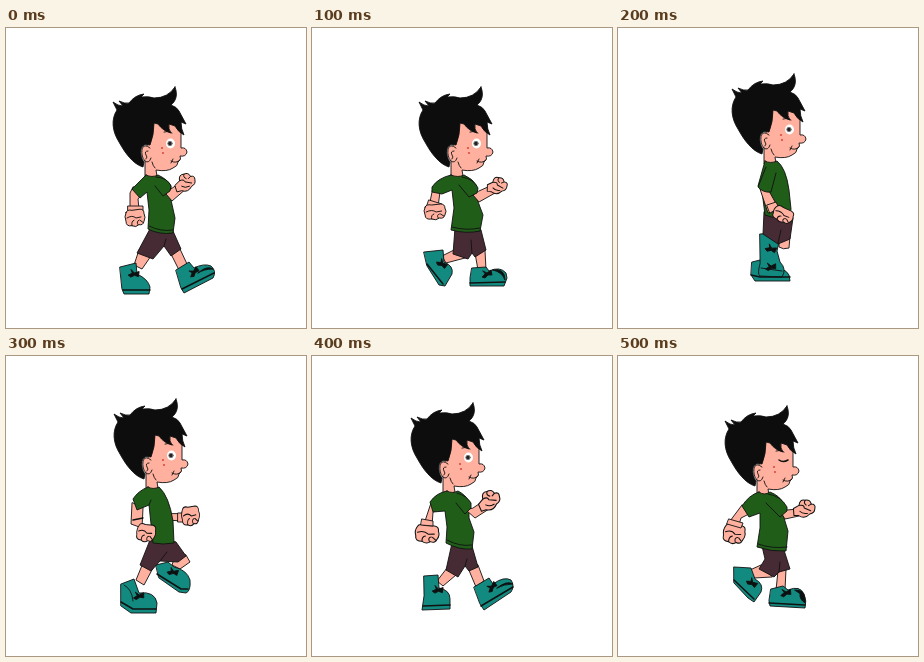
Write an HTML page that moves like this. It is 300x300 px and loops after 600 ms.

```html
<!DOCTYPE html>
<html lang="en">
<head>
<meta charset="utf-8">
<title>Walking boy</title>
<style>
html, body { margin: 0; width: 100%; height: 100%; overflow: hidden; background: #fff; }
svg { display: block; width: 100vw; height: 100vh; }
path, circle { stroke: #111; stroke-width: .9; stroke-linejoin: round; stroke-linecap: round; }
.skin { fill: #ffb09e; }
.hair { fill: #0d0d0d; }
.shirt { fill: #205d19; }
.shorts { fill: #472b34; }
.shoe { fill: #128a80; }
.dark { fill: #0b1010; }
.line, .sole { fill: none; }
.sole { stroke-width: 1.5; }
.plain { stroke: none; }
.pose { visibility: hidden; animation: show .6s step-end infinite; animation-delay: calc(var(--i) * .1s - .6s); }
@keyframes show {
  0% { visibility: visible; }
  16.6667%, 100% { visibility: hidden; }
}
</style>
</head>
<body>
<svg viewBox="0 0 300 300">
<defs>
  <g id="head">
    <path class="skin" d="M139 132V149Q146 152 151 148L150 142Q161 144 167 140Q172 138 172 134Q176 131 174 128Q180 129 181 124Q180 119 175 120L175 100L158 88L145 92Z"/>
    <path class="hair" d="M169 59C172 67 170 73 165 77Q171 79 173 83L180 96L175 94Q175 101 178 107Q172 104 169 98L163 96Q162 101 165 105Q157 103 152 96L148 95Q148 107 144 117Q137 115 135 121Q134 129 138 134L137 139C127 136 119 125 113 114C106 103 105 91 111 82L107 74Q112 78 117 78L113 73Q119 76 123 75Q129 67 138 66L135 69Q143 68 148 70Q162 70 169 59Z"/>
    <path class="skin" d="M144 120Q138 115 136 121Q135 129 139 133Q143 136 145 130"/>
    <path class="line" d="M142 123Q138 123 140 127Q142 129 140 131M165 133Q170 136 174 132M167 131L165 135M146 134Q147 138 149 140M158 104Q162 102 166 105"/>
    <g fill="#d5362e"><circle class="plain" cx="156" cy="120" r=".9"/><circle class="plain" cx="157" cy="125" r=".9"/></g>
  </g>
  <g id="eye">
    <ellipse class="plain" cx="164.500" cy="115.500" rx="4.500" ry="5" fill="#fff"/>
    <circle cx="164" cy="115.500" r="2.200" fill="#222" style="stroke:#777"/>
  </g>
  <!-- fists are centred on the origin -->
  <g id="fist">
    <path class="skin" d="M-9-5Q-8-8-3-7L5-8Q9-8 9-4Q11-1 9 3Q8 7 4 6Q1 9-3 7Q-9 8-9 3Q-11-1-9-5Z"/>
    <path class="line" d="M-8 0Q-3-3 1 0L6-1M-3 7Q-4 3-1 2M3 6Q1 3 4 2M8 4L5 2"/>
  </g>
  <g id="punch">
    <path class="skin" d="M-9 2L-5-2Q-6-8-1-8Q3-10 5-6Q9-7 9-3Q10 1 6 3Q3 9-3 7L-7 8Z"/>
    <path class="line" d="M-5-2Q-1-4 0-1L6 0M-1-8Q-2-5 1-4M5-6L3-4M-3 3Q0 5 4 3"/>
  </g>
  <path id="lace" class="dark" d="M-4-3L0-1L4-4L5 1L1 1L-2 4L-5 3L-2 0Z"/>
</defs>

<g class="pose" style="--i:0">
  <path class="skin" d="M133 222L128 237L136 241L145 228ZM165 226L173 242L181 236L174 221Z"/>
  <path class="shoe" d="M114 239L130 235L131 246Q142 251 144 259L143 266H118L116 261Z"/>
  <path class="sole" d="M117 262H144"/>
  <use href="#lace" transform="translate(128 246) rotate(20)"/>
  <path class="shoe" d="M170 242L183 234L188 240Q198 235 205 238Q211 243 207 250L178 265L175 260Z"/>
  <path class="sole" d="M176 261L208 245"/>
  <path class="dark" d="M192 245Q201 237 207 241Q198 241 192 245Z"/>
  <use href="#lace" transform="translate(188 244) rotate(-25)"/>
  <path class="shorts" d="M145 199L131 225L147 231L158 218L165 228L175 221L167 203Z"/>
  <path class="line" d="M158 218L160 211"/>
  <use href="#head"/><use href="#eye"/>
  <path class="skin" d="M127 159L124 165V181H133L132 171L136 166Z"/>
  <path class="shirt" d="M140 147L126 161L134 170L141 164L143 182L142 201Q154 207 167 205L169 190L165 172L165 158Q161 151 152 147Q146 150 140 147Z"/>
  <path class="line" d="M143 198Q155 204 167 202"/>
  <path class="skin" d="M160 166L166 173L181 160L175 154L165 161Z"/>
  <path class="shirt" d="M150 149Q162 150 165 158L164 163L157 168L149 158"/>
  <path class="skin" d="M122 178H137V184H122Z"/>
  <use href="#fist" transform="translate(129 190) scale(1 1.100)"/>
  <use href="#punch" transform="translate(179 155) scale(1.100)"/>
</g>

<g class="pose" style="--i:1">
  <path class="skin" d="M142 222L130 228L134 235L153 230ZM163 225L166 242H174L173 222Z"/>
  <path class="shoe" d="M112 224L131 222L132 234Q142 238 140 246L133 258L127 257L115 238Z"/>
  <path class="sole" d="M115 236L131 256"/>
  <use href="#lace" transform="translate(130 236) rotate(50)"/>
  <path class="shoe" d="M160 240L174 239L177 243Q188 238 194 245L195 250L192 258H158V250Z"/>
  <path class="sole" d="M158 255L193 254"/>
  <path class="dark" d="M181 242Q193 240 193 252Q190 244 181 242Z"/>
  <use href="#lace" transform="translate(175 246)"/>
  <path class="shorts" d="M143 200L141 226L156 231L160 225L163 229L174 222L169 202Z"/>
  <path class="line" d="M160 225L159 212"/>
  <use href="#head"/><use href="#eye"/>
  <path class="skin" d="M121 159L117 179H126L128 164Z"/>
  <path class="shirt" d="M139 147Q126 150 120 159L120 164L130 166L140 162L142 180L139 202Q154 206 168 203L171 187L165 171L164 157Q161 151 152 147Q146 150 139 147Z"/>
  <path class="line" d="M140 199Q154 203 168 200"/>
  <path class="skin" d="M161 167L167 174L183 165L178 158L167 163Z"/>
  <path class="shirt" d="M150 149Q162 151 166 160L165 165L157 169L147 157"/>
  <path class="skin" d="M117 172L130 176L129 181L115 178Z"/>
  <use href="#fist" transform="translate(123 184) scale(1.100 1)"/>
  <use href="#punch" transform="translate(185 158) rotate(20) scale(1.050)"/>
</g>

<g class="pose" style="--i:2">
  <path class="skin" d="M161 209V219Q165 222 171 220L172 208Z"/>
  <path class="shoe" d="M134 234L146 231L149 238Q167 239 171 247L172 253H137L133 247Z"/>
  <path class="shoe" d="M142 206L158 205L161 214L159 223L162 234Q169 241 164 249L142 248Q139 246 142 236Z"/>
  <path class="sole" d="M133 247L142 249H172"/>
  <path class="line" d="M143 240L164 243"/>
  <use href="#lace" transform="translate(153 221) rotate(35)"/>
  <use href="#lace" transform="translate(153 239) rotate(10)"/>
  <path class="shorts" d="M146 184L145 206L160 216L172 211L175 190Z"/>
  <path class="line" d="M160 215L163 202"/>
  <use href="#head" transform="translate(7 -13)"/><use href="#eye" transform="translate(7 -14)"/>
  <path class="shirt" d="M147 133L140 158L144 163L147 187Q160 192 172 189L173 181L171 162Q168 140 159 133Q152 136 147 133Z"/>
  <path class="skin" d="M142 161L150 185L161 181L151 163Z"/>
  <path class="shirt" d="M148 139L140 159Q145 165 153 164L158 145"/>
  <path class="skin" d="M149 177L158 174L161 180L152 185Z"/>
  <use href="#fist" transform="translate(165 187) rotate(30) scale(1.050 .95)"/>
</g>

<g class="pose" style="--i:3">
  <path class="skin" d="M137 207L130 224L138 229L147 212ZM169 200L166 209L174 213L184 206L180 199Z"/>
  <path class="shoe" d="M115 228L128 223L133 237Q149 235 151 247L150 257H125L115 250Z"/>
  <path class="sole" d="M115 246L127 253H150"/>
  <path class="line" d="M118 229Q126 233 127 245"/>
  <use href="#lace" transform="translate(133 240) rotate(10)"/>
  <path class="shoe" d="M150 209L162 206L168 211Q181 214 184 224Q185 235 180 237L173 236L153 222Z"/>
  <path class="sole" d="M151 218L175 233L182 233"/>
  <use href="#lace" transform="translate(167 216) rotate(30)"/>
  <path class="shorts" d="M144 184L134 209L145 215L154 205L172 206L180 200L170 186Z"/>
  <path class="line" d="M154 205L161 196"/>
  <use href="#head" transform="translate(1 -16)"/><use href="#eye" transform="translate(1 -16)"/>
  <path class="skin" d="M126 147L125 168L136 172L137 152Z"/>
  <path class="skin" d="M160 158V164L177 165V158Z"/>
  <path class="shirt" d="M142 131Q132 135 127 143L131 154L143 149L147 187Q157 189 168 187L167 165Q163 140 153 131Q147 134 142 131Z"/>
  <path class="line" d="M143 149L145 144"/>
  <path class="sole" d="M127 164L137 162"/>
  <use href="#fist" transform="translate(140 177) rotate(15) scale(.95 1.150)"/>
  <path class="skin" d="M172 157H177V166H172Z"/>
  <use href="#fist" transform="translate(184.500 160) scale(.9 1.250)"/>
</g>

<g class="pose" style="--i:4">
  <path class="skin" d="M135 212L125 225L131 230L144 219ZM156 212L164 231L172 225L166 209Z"/>
  <path class="shoe" d="M112 220L126 219L127 232Q138 234 138 243V253L110 254L112 240Z"/>
  <path class="sole" d="M111 250L138 249"/>
  <use href="#lace" transform="translate(126 234) rotate(20)"/>
  <path class="shoe" d="M162 231L177 222L181 228Q192 220 199 224Q203 230 199 236L172 254L168 248Z"/>
  <path class="sole" d="M169 250L201 231"/>
  <path class="dark" d="M185 232Q195 224 201 228Q192 228 185 232Z"/>
  <use href="#lace" transform="translate(180 231) rotate(-28)"/>
  <path class="shorts" d="M140 187L134 214L146 221L153 210L157 215L166 211L160 190Z"/>
  <path class="line" d="M153 210L155 203"/>
  <use href="#head" transform="translate(-8 -12)"/><use href="#eye" transform="translate(-8 -14)"/>
  <path class="skin" d="M119 147L113 165L120 170L121 156L127 154Z"/>
  <path class="shirt" d="M135 135Q124 137 118 146L121 156L133 155L135 171L134 187Q147 194 160 193L162 176L157 162L157 146Q154 139 146 135Q140 138 135 135Z"/>
  <path class="line" d="M135 184Q148 191 160 189"/>
  <path class="skin" d="M154 154L163 162L177 153L170 146L161 152Z"/>
  <path class="shirt" d="M145 137Q155 140 159 147V152L153 158L144 147"/>
  <use href="#fist" transform="translate(115 178) rotate(10) scale(1.200 1.150)"/>
  <path class="skin" d="M110 163L121 165V170L109 169Z"/>
  <use href="#punch" transform="translate(177 145) rotate(-5) scale(1.200)"/>
</g>

<g class="pose" style="--i:5">
  <path class="skin" d="M143 209L132 214L136 222L154 221ZM160 215L158 234H167L168 213Z"/>
  <path class="shoe" d="M116 211L133 212L137 223Q146 228 143 236L136 246L130 242L116 227Z"/>
  <path class="sole" d="M116 224L136 243"/>
  <use href="#lace" transform="translate(134 227) rotate(50)"/>
  <path class="shoe" d="M153 233L165 230L170 234Q182 229 186 238Q189 245 187 252L152 250L151 245Z"/>
  <path class="sole" d="M151 247L187 249"/>
  <use href="#lace" transform="translate(168 237) rotate(5)"/>
  <path class="dark" d="M177 234Q188 233 187 247Q181 243 182 238Z"/>
  <path class="shorts" d="M144 190L147 203L141 213L156 221L161 216L172 213L165 191Z"/>
  <path class="line" d="M161 216L162 206"/>
  <use href="#head" transform="translate(0 -9)"/>
  <path class="sole" d="M161 104Q165 107 170 104"/>
  <path class="skin" d="M124 149L112 165L120 172L123 162L131 158Z"/>
  <path class="shirt" d="M141 136Q131 139 124 150L131 161L142 157L142 172L139 191Q154 196 168 195L170 175L166 162L165 147Q162 140 152 136Q146 140 141 136Z"/>
  <path class="line" d="M140 188Q154 193 169 191"/>
  <path class="skin" d="M162 155L167 163L181 160L180 153L169 154Z"/>
  <path class="shirt" d="M150 138Q163 140 169 151V155L162 161L148 147"/>
  <use href="#fist" transform="translate(116 178) rotate(15) scale(1.100 1.250)"/>
  <path class="skin" d="M111 163L125 167L123 172L109 168Z"/>
  <use href="#punch" transform="translate(186 153) rotate(15) scale(1.150 1.100)"/>
</g>
</svg>
</body>
</html>
```
